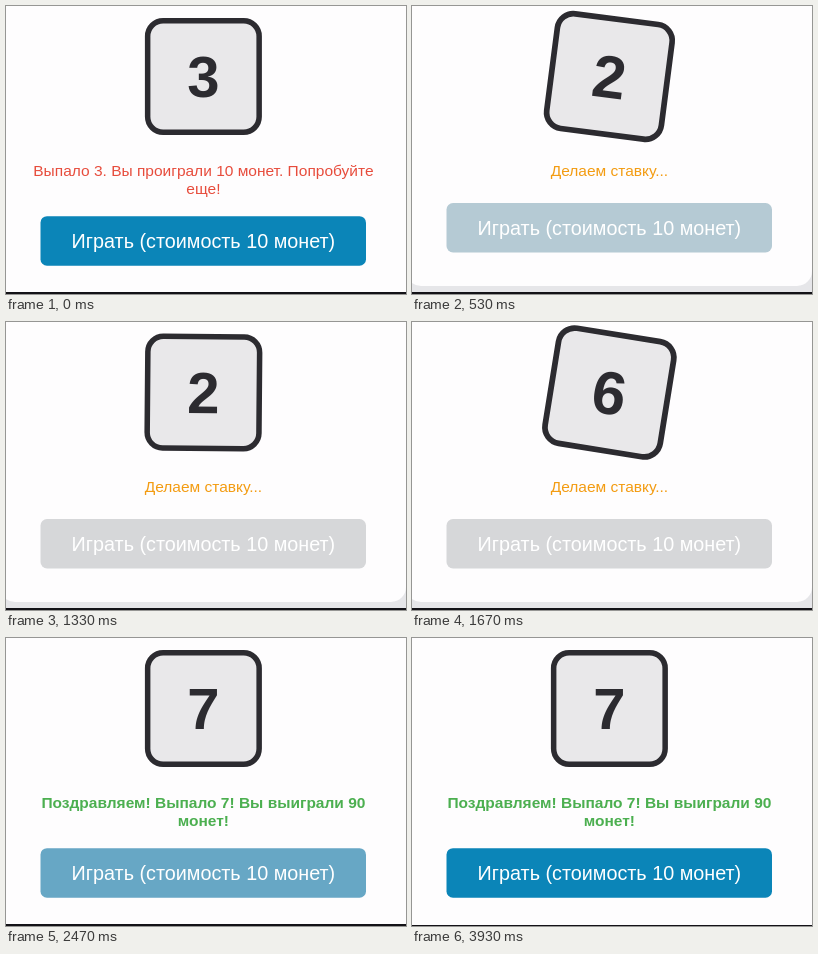
An HTML page that plays this animation: 400 by 288 pixels, repeating every 4 s.

```html
<!DOCTYPE html>
<html lang="ru">
<head>
<meta charset="utf-8">
<title>Игра</title>
<style>
html, body { margin: 0; width: 100%; height: 100%; overflow: hidden; background: #fefdfe; }
svg { display: block; width: 100vw; height: 100vh; }
text { font-family: "Liberation Sans", Arial, sans-serif; text-anchor: middle; }
.msg { font-size: 15.5px; }
</style>
</head>
<body>
<svg viewBox="0 0 400 288">
  <rect width="400" height="288" fill="#e6e6e9"/>
  <rect id="card" x="-6" y="-40" width="406" rx="15" fill="#fefdfe"/>
  <rect id="line" width="400" height="4" fill="#131217"/>
  <g id="die">
    <rect x="-55.75" y="-55.75" width="111.5" height="111.5" rx="15.5" fill="#e9e8ea" stroke="#2c2b30" stroke-width="5.5"/>
    <text id="digit" y="20.5" font-size="58" font-weight="bold" fill="#2c2b30"></text>
  </g>
  <text id="top" class="msg" x="197.4" y="169.8"></text>
  <text id="low" class="msg" x="197.4" y="188.2"></text>
  <g id="btn">
    <rect id="face" x="34.5" width="325.5" height="49.5" rx="6.5"/>
    <text x="197.4" y="31.5" font-size="19.8" fill="#fff">Играть (стоимость 10 монет)</text>
  </g>
</svg>
<script>
const LOOP = 4000, START = 370, END = 2380, SPIN = 500, TICK = 100, FADE = 300, HOVER = 3600;
const ROLLS = "32614958725146283915";
const BLUE = [0, 122, 179], HOT = [11, 133, 184], GREY = [214, 215, 217];
const STATES = {
  lost: { top: "Выпало 3. Вы проиграли 10 монет. Попробуйте", low: "еще!", fill: "#e74c3c", weight: 400 },
  roll: { top: "Делаем ставку...", low: "", fill: "#f39c12", weight: 400 },
  won: { top: "Поздравляем! Выпало 7! Вы выиграли 90", low: "монет!", fill: "#4caf50", weight: 700 }
};
const $ = id => document.getElementById(id);
const set = (id, attrs) => { for (const k in attrs) $(id).setAttribute(k, attrs[k]); };
const clamp = v => Math.min(1, Math.max(0, v));

// CSS-style cubic-bezier timing
function bezier(x1, y1, x2, y2) {
  const at = (a, b, u) => 3 * a * u * (1 - u) ** 2 + 3 * b * u * u * (1 - u) + u ** 3;
  return x => {
    let lo = 0, hi = 1;
    for (let i = 0; i < 20; i++) {
      const mid = (lo + hi) / 2;
      if (at(x1, x2, mid) < x) lo = mid; else hi = mid;
    }
    return at(y1, y2, (lo + hi) / 2);
  };
}
const ease = bezier(0.25, 0.1, 0.25, 1);
const easeInOut = bezier(0.42, 0, 0.58, 1);
const fade = (from, to, t) => {
  const k = ease(clamp(t / FADE));
  return from.map((c, i) => Math.round(c + (to[i] - c) * k));
};

function buttonColor(t) {
  if (t < START) return HOT;
  if (t < END) return fade(HOT, GREY, t - START);
  if (t < HOVER) return fade(GREY, BLUE, t - END);
  return fade(BLUE, HOT, t - HOVER);
}

function draw(t) {
  const name = t < START ? "lost" : t < END ? "roll" : "won";
  const rolling = name === "roll", state = STATES[name];
  let tilt = 0, digit = name === "lost" ? "3" : "7";
  if (rolling) {
    const age = t - START, p = (age % SPIN) / SPIN;
    tilt = p < 0.5 ? easeInOut(p * 2) : 1 - easeInOut(p * 2 - 1);
    digit = ROLLS[Math.min(ROLLS.length - 1, Math.floor(age / TICK))];
  }
  set("die", { transform: `translate(197.4 70.5) rotate(${10 * tilt}) scale(${1 + 0.05 * tilt})` });
  $("digit").textContent = digit;
  for (const id of ["top", "low"]) {
    $(id).textContent = state[id];
    set(id, { fill: state.fill, "font-weight": state.weight });
  }
  set("btn", { transform: `translate(0 ${rolling ? 197 : 210.2})` });
  set("face", { fill: `rgb(${buttonColor(t)})` });
  set("card", { height: rolling ? 320 : 345 });
  set("line", { y: t < 2730 ? 286 : 287 });
}

const begin = performance.now();
function frame() {
  draw((performance.now() - begin) % LOOP);
  requestAnimationFrame(frame);
}
frame();
</script>
</body>
</html>
```
